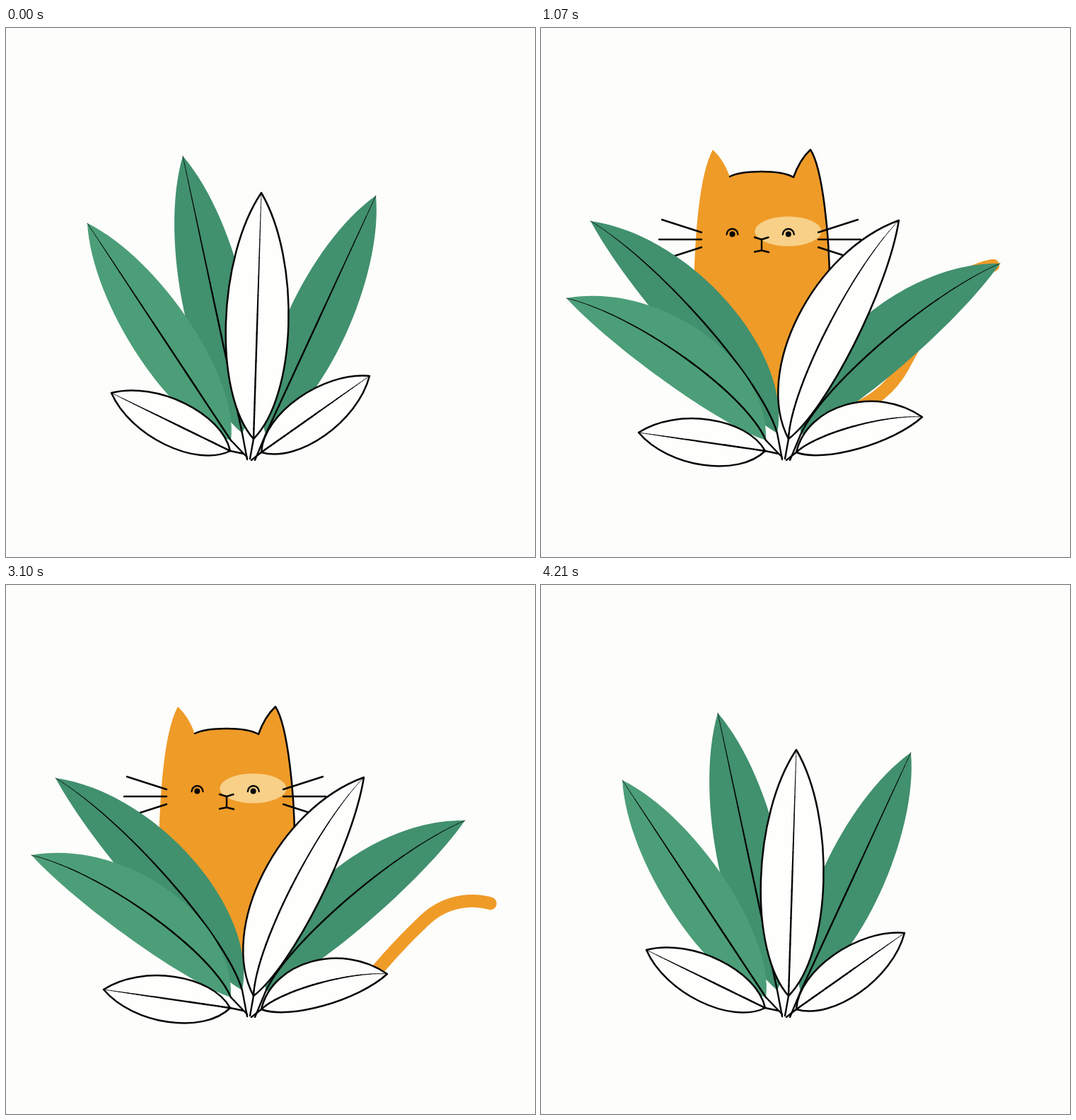
These frames come from a looping animation (748x748 px, 4.32 s). An HTML page with a canvas:

```html
<!DOCTYPE html>
<html lang="en">
<head>
<meta charset="utf-8">
<title>Cat in the leaves</title>
<style>
  html, body { margin: 0; width: 100%; height: 100%; overflow: hidden; background: #fdfdfb; }
  canvas { display: block; }
</style>
</head>
<body>
<canvas id="stage" width="748" height="748"></canvas>
<script>
const ctx = document.getElementById('stage').getContext('2d');
const LOOP = 4320;
const INK = '#050505', ORANGE = '#ef9b28', PATCH = '#f8d088';
const DARK = '#41906e', LIGHT = '#4c9e78', WHITE = '#fefefd', PAPER = '#fdfdfb';
const ROOT = [345, 608];
const TAIL_ROOT = [440, 540], TAIL_LENGTH = 296;

const mix = (a, b, k) => a + (b - a) * k;
const smooth = (t, from, to) => {
  const u = Math.min(1, Math.max(0, (t - from) / (to - from)));
  return u * u * (3 - 2 * u);
};

function stroke(width, color = INK) {
  ctx.lineWidth = width;
  ctx.strokeStyle = color;
  ctx.stroke();
}

// A leaf swings from shut to open while its middle bows sideways by bend
const leaf = (fill, shut, open, base, foot, width, bend) => ({ fill, shut, open, base, foot, width, bend });
const leaves = [
  leaf(DARK, [523, 237], [649, 333], [367, 575], [352, 611], 58, -32),
  leaf(DARK, [250, 181], [70, 273], [334, 573], [341, 610], 59, 34),
  leaf(LIGHT, [115, 276], [36, 382], [318, 583], [341, 607], 58, 38),
  leaf(WHITE, [361, 233], [506, 272], [350, 581], [345, 609], 59, -29),
  leaf(WHITE, [149, 516], [138, 572], [317, 598], [336, 602], 43, 0),
  leaf(WHITE, [514, 492], [539, 550], [361, 600], [347, 611], 43, -18)
];

function swing(a, b, k) {
  const polar = ([x, y]) => [Math.atan2(x - ROOT[0], ROOT[1] - y), Math.hypot(x - ROOT[0], y - ROOT[1])];
  const [a0, r0] = polar(a), [a1, r1] = polar(b);
  const angle = mix(a0, a1, k), r = mix(r0, r1, k);
  return [ROOT[0] + r * Math.sin(angle), ROOT[1] - r * Math.cos(angle)];
}

function drawLeaf({ fill, shut, open, base, width, bend }, k) {
  const tip = swing(shut, open, k), bow = bend * k;
  const dx = base[0] - tip[0], dy = base[1] - tip[1], len = Math.hypot(dx, dy);
  const at = (f, off) => [tip[0] + dx * f + dy / len * off, tip[1] + dy * f - dx / len * off];
  const near = 0.27, far = 0.82;

  ctx.beginPath();
  ctx.moveTo(...tip);
  ctx.bezierCurveTo(...at(near, bow + width), ...at(far, bow + width), ...base);
  ctx.bezierCurveTo(...at(far, bow - width), ...at(near, bow - width), ...tip);
  ctx.fillStyle = fill;
  ctx.fill();
  if (fill === WHITE) stroke(2.5);

  // Midrib, thin at the tip
  const steps = 30;
  const point = t => {
    const v = 1 - t;
    return at(3 * t * v * (v * near + t * far) + t ** 3, 3 * t * v * bow);
  };
  for (let i = 0; i < steps; i++) {
    ctx.beginPath();
    ctx.moveTo(...point(i / steps));
    ctx.lineTo(...point((i + 1) / steps));
    stroke(Math.min(2.4, 0.7 + 3.4 * i / steps));
  }
}

function drawPlant(k) {
  for (const item of leaves) drawLeaf(item, k);
  for (const { base, foot } of leaves) {
    ctx.beginPath();
    ctx.moveTo(...base);
    ctx.lineTo(...foot);
    stroke(2.4);
  }
}

// Tail headings in degrees, from root to tip, at key times
const curled = [110, 100, 90, 90], raised = [90, 86, 66, 50];
const tailKeys = [
  [480, curled],
  [790, raised],
  [1070, [20, 62, 60, 10]],
  [1720, [25, -8, 0, 75]],
  [2170, [45, -15, -35, 10]],
  [2620, [-38, 34, 30, -2]],
  [3550, [-35, 62, 49, -14]],
  [3820, raised],
  [4080, curled]
];

function headings(t) {
  const last = tailKeys.length - 1;
  if (t <= tailKeys[0][0] || t >= tailKeys[last][0]) return curled;
  const i = tailKeys.findIndex(key => key[0] > t) - 1;
  const [t0, a] = tailKeys[i], [t1, b] = tailKeys[i + 1];
  const span = t1 - t0, u = (t - t0) / span;
  const slope = (n, c) => n === 0 || n === last ? 0 :
    (tailKeys[n + 1][1][c] - tailKeys[n - 1][1][c]) / (tailKeys[n + 1][0] - tailKeys[n - 1][0]) * span;
  return a.map((v, c) => mix(v, b[c], smooth(u, 0, 1)) +
    u * (1 - u) * ((1 - u) * slope(i, c) - u * slope(i + 1, c)));
}

function drawTail(t, rise) {
  const bends = headings(t), parts = bends.length - 1, steps = 60;
  const step = TAIL_LENGTH * mix(0.45, 1, rise) / steps;
  let [x, y] = TAIL_ROOT;
  ctx.beginPath();
  ctx.moveTo(x, y);
  for (let i = 0; i < steps; i++) {
    const s = (i + 0.5) / steps * parts, n = Math.floor(s);
    const angle = mix(bends[n], bends[n + 1], s - n) * Math.PI / 180;
    x += step * Math.cos(angle);
    y -= step * Math.sin(angle);
    ctx.lineTo(x, y);
  }
  stroke(18, ORANGE);
}

function drawCat(rise, look) {
  if (rise <= 0) return;
  const sx = mix(0.71, 1, rise), sy = mix(0.5, 1, rise), top = mix(419, 172, rise);
  // Build the path in cat space, paint it in stage space
  const shape = build => {
    ctx.save();
    ctx.transform(sx, 0, 0, sy, 348 * (1 - sx), top - 172 * sy);
    ctx.beginPath();
    build();
    ctx.restore();
  };
  const fill = color => { ctx.fillStyle = color; ctx.fill(); };
  const poly = (...pts) => pts.forEach(([x, y], i) => i ? ctx.lineTo(x, y) : ctx.moveTo(x, y));
  const crown = () => {
    ctx.bezierCurveTo(285, 201, 338, 200, 357, 211);
    ctx.quadraticCurveTo(366, 186, 381, 172);
    ctx.bezierCurveTo(399, 200, 408, 300, 408, 360);
    ctx.lineTo(409, 470);
  };

  ctx.save();
  ctx.beginPath();
  ctx.rect(0, 0, 748, 548);
  ctx.clip();

  shape(() => {
    ctx.moveTo(243, 172);
    ctx.quadraticCurveTo(258, 186, 267, 210);
    crown();
    ctx.bezierCurveTo(395, 560, 230, 560, 216, 470);
    ctx.lineTo(216, 400);
    ctx.bezierCurveTo(216, 320, 221, 212, 243, 172);
  });
  fill(ORANGE);
  shape(() => ctx.ellipse(349.5, 287.5, 47, 21, 0, 0, 7));
  fill(PATCH);
  shape(() => { ctx.moveTo(267, 210); crown(); });
  stroke(2.5);

  for (const x of [270.5, 349.8]) {
    shape(() => ctx.arc(x, 292, 8, Math.PI, 0));
    stroke(2.3);
    shape(() => ctx.arc(x + 3.5 * look, 291.5 - 1.5 * Math.abs(look), 4, 0, 7));
    fill(INK);
  }

  shape(() => {
    poly([302, 296], [312, 299], [321.5, 296]);
    poly([312, 299], [312, 314.5]);
    poly([302, 316.5], [312, 314.5], [322, 317]);
    for (const side of [-1, 1]) {
      const x = d => 309.5 + side * d;
      poly([x(82.5), 289], [x(138.5), 271]);
      poly([x(82.5), 299], [x(142.5), 299]);
      poly([x(82.5), 310], [x(138.5), 328]);
    }
  });
  stroke(2.4);
  ctx.restore();
}

function draw(t) {
  const open = smooth(t, 440, 1070) - smooth(t, 3540, 4180);
  const rise = smooth(t, 470, 918) - smooth(t, 3692, 4140);
  const look = smooth(t, 1200, 1400) - 2 * smooth(t, 2280, 2500) + smooth(t, 2930, 3130);
  ctx.fillStyle = PAPER;
  ctx.fillRect(0, 0, 748, 748);
  ctx.lineCap = ctx.lineJoin = 'round';
  drawTail(t, rise);
  drawCat(rise, look);
  drawPlant(open);
}

const start = performance.now();
function frame() {
  draw((performance.now() - start) % LOOP);
  requestAnimationFrame(frame);
}
frame();
</script>
</body>
</html>
```
